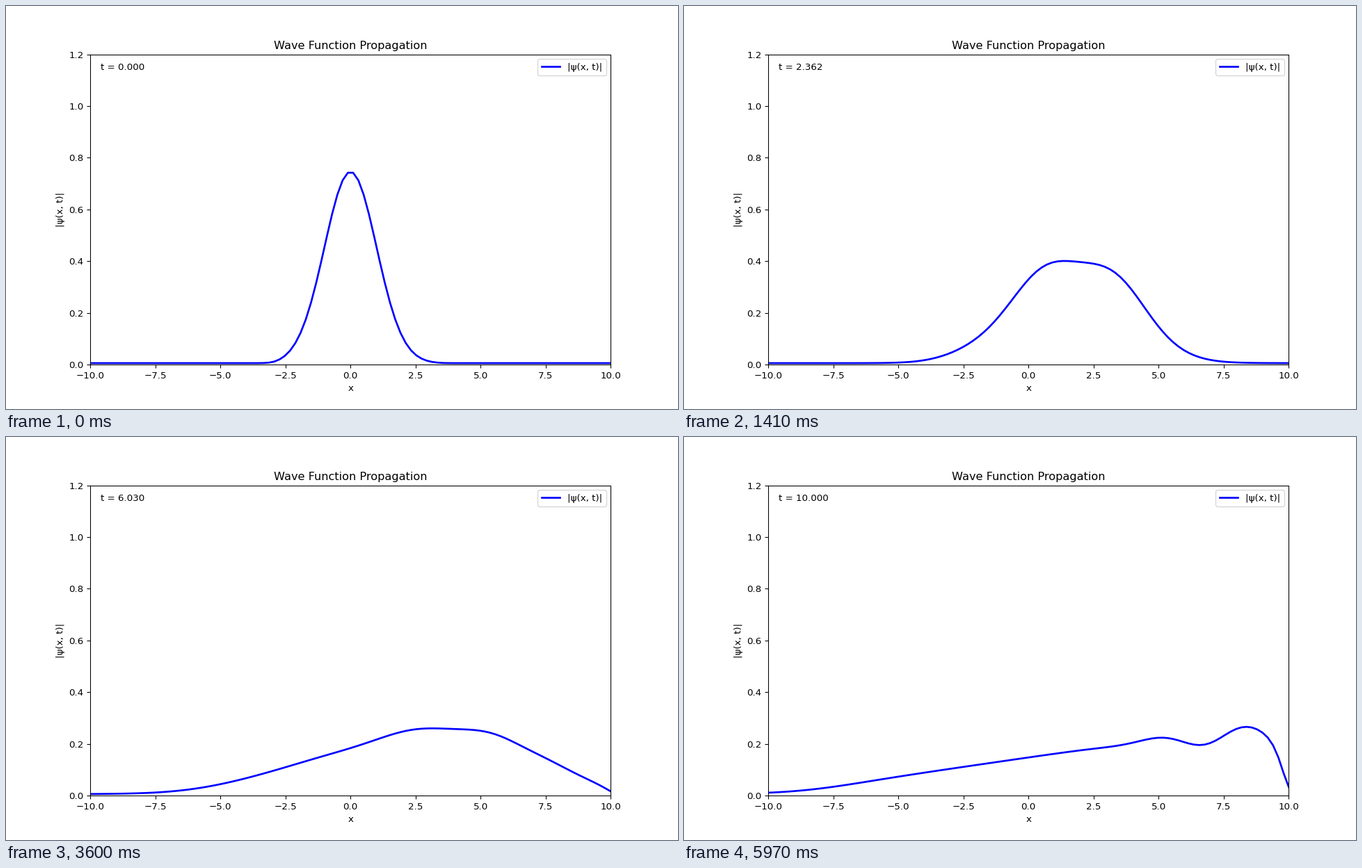
Write a matplotlib script that moves like this. It is 966x580 px and loops after 6000 ms.

```python
import numpy as np
import matplotlib.pyplot as plt
from matplotlib.animation import FuncAnimation

DPI = 96.6
FRAMES = 200
times = np.linspace(0, 10, FRAMES)
x = np.linspace(-10, 10, 100)


def step(u):
    """Smooth switch from 0 to 1 around u = 0."""
    return 1 / (1 + np.exp(-u))


def ripple(u, wave):
    """A short burst of one sine wave, odd about u = 0."""
    return np.sin(2 * np.pi * u / wave) * np.exp(-2 * (u / wave) ** 2)


def psi_abs(t):
    # Free Gaussian packet with unit momentum
    var = 1 + t ** 2
    packet = 0.74 * var ** -0.25 * np.exp(-(x - t) ** 2 / (2 * var))

    # Both flanks are cut off by fronts that travel outwards
    rear = step((x + 3 + 0.48 * t) / min(1.4, 0.2 + 0.3 * t))
    front = step((3.5 + 0.64 * t - x) / (0.2 + 1.3 * np.sin(np.pi * t / 10)))
    wall = np.tanh((10.2 - x) / 0.6)

    # An early ripple rides along and fades, a late one builds up at the wall
    age = t / 1.8
    early = 0.11 * age * np.exp(1 - age) * ripple(x + 0.4 - 0.6 * t, 5)
    late = 0.15 * (t / 10) ** 3 * ripple(x - 7.5, 3.8)

    return 0.006 + packet * rear * front * wall * (1 - early + late)


fig, ax = plt.subplots(figsize=(966.01 / DPI, 580.01 / DPI), dpi=DPI)
fig.subplots_adjust(left=0.1253)
line, = ax.plot([], [], color="blue", lw=2, label="|ψ(x, t)|")
clock = ax.text(0.02, 0.95, "", transform=ax.transAxes)
ax.set(xlim=(-10, 10), ylim=(0, 1.2), xlabel="x", ylabel="|ψ(x, t)|",
       title="Wave Function Propagation")
ax.legend(loc="upper right")


def update(i):
    line.set_data(x, psi_abs(times[i]))
    clock.set_text(f"t = {times[i]:.3f}")
    return line, clock


anim = FuncAnimation(fig, update, frames=FRAMES, interval=30, repeat=True, repeat_delay=0)
plt.show()
```
